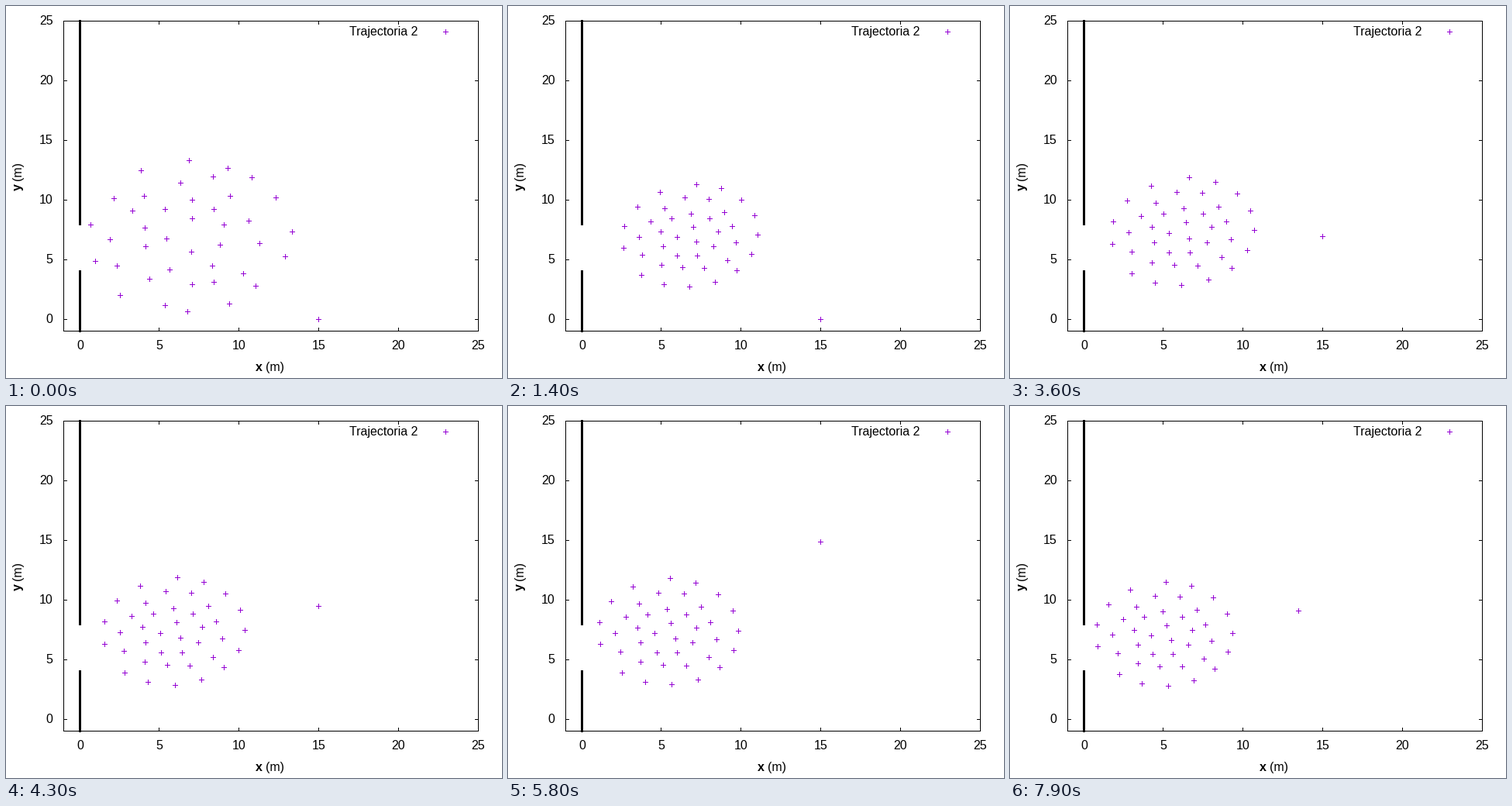
Write a matplotlib script that moves like this. It is 640 by 480 pixels and loops after 8 s.

```python
import numpy as np
import matplotlib.pyplot as plt
from matplotlib.animation import FuncAnimation
from matplotlib.collections import LineCollection

W, H, DPI = 640, 480, 100
FRAMES, STEP = 80, 100
PX = 72 / DPI
PURPLE = "#9400d3"
LEFT, RIGHT, TOP, BOTTOM = 74, 609, 19, 419

# Crowd centre (m), size and lean at a few key times (ms)
TIMES = [0, 900, 1400, 1900, 2600, 3600, 5000, 7900]
CENTRE_X = [6.8, 6.8, 6.75, 6.7, 6.55, 6.15, 5.5, 5.0]
CENTRE_Y = [7.05, 7.0, 7.0, 7.1, 7.15, 7.35, 7.4, 7.15]
SIZE = [1.43, 1.09, 0.96, 1.06, 0.97, 1.01, 1, 0.97]
LEAN = [0, 0.05, 0.07, 0.07, 0.06, 0.07, 0, 0]


def px(x):
    return LEFT + (x + 1) * (RIGHT - LEFT) / 26


def py(y):
    return BOTTOM - (y + 1) * (BOTTOM - TOP) / 26


def ring(n, radius, start, gap):
    deg = start + gap * np.arange(n)
    a = np.radians(deg)
    return np.column_stack([radius(deg) * np.cos(a), radius(deg) * np.sin(a)])


def flat(r):
    return lambda deg: np.full(len(deg), r)


def wavy(deg):
    return 3.12 + 0.3 * np.cos(np.radians(3 * (deg - 83)))


# Evenly spaced people: an outer ring in two arcs, two inner rings and a core
CROWD = np.vstack([
    ring(11, flat(4.5), -129.3, 21.7),
    ring(4, flat(4.35), 119.5, 25),
    ring(13, wavy, 15.9, 27.7),
    ring(9, flat(1.9), 10, 40),
    ring(3, flat(0.78), 72, 120),
])
SCATTER = np.random.default_rng(4).normal(0, 0.3, CROWD.shape)


def crowd(t):
    cx, cy, size, lean = (np.interp(t, TIMES, k)
                          for k in (CENTRE_X, CENTRE_Y, SIZE, LEAN))
    x, y = (CROWD * size + SCATTER * max(0, 1 - t / 1400)).T
    return np.column_stack([px(cx + x + lean * y), py(cy + y)])


def walker(t):
    """Constant speed: up along x = 15, left to 13.5, then down."""
    d = max(0, t - 1669) * 0.0036
    if d < 15:
        x, y = 15, d
    elif d < 16.5:
        x, y = 30 - d, 15
    else:
        x, y = 13.5, 31.5 - d
    return px(x), py(y)


def crosses(points):
    segs = []
    for x, y in np.rint(points):
        segs.append([(x - 3, y + 0.5), (x + 4, y + 0.5)])
        segs.append([(x + 0.5, y - 3), (x + 0.5, y + 4)])
    return segs


fig = plt.figure(figsize=(W / DPI, H / DPI), dpi=DPI, facecolor="white")
ax = fig.add_axes([0, 0, 1, 1])
ax.set_xlim(0, W)
ax.set_ylim(H, 0)
ax.axis("off")


def lines(segs, color, width=1):
    col = LineCollection(segs, colors=color, linewidths=width * PX, capstyle="butt")
    col.set_snap(False)
    ax.add_collection(col, autolim=False)
    return col


def label(x, y, s, ha="left", **kw):
    ax.text(x, y, s, ha=ha, va="baseline", family="Liberation Sans",
            size=16 * PX, color="black", **kw)


def axis_name(x, y, s, dx, dy, **kw):
    label(x, y, s, weight="bold", **kw)
    label(x + dx, y + dy, "(m)", **kw)


frame = [[(LEFT, y + 0.5), (RIGHT + 1, y + 0.5)] for y in (TOP, BOTTOM)]
frame += [[(x + 0.5, TOP), (x + 0.5, BOTTOM + 1)] for x in (LEFT, RIGHT)]
for k in range(0, 26, 5):
    x, y = round(px(k)), round(py(k))
    frame += [[(x + 0.5, e), (x + 0.5, e + 5)] for e in (TOP, BOTTOM - 4)]
    frame += [[(e, y + 0.5), (e + 5, y + 0.5)] for e in (LEFT, RIGHT - 4)]
    label(x + 0.5, 443, str(k), "center")
    label(60.5, y + 5, str(k), "right")
lines(frame, "black")
lines([[(95.5, 18), (95.5, 283)], [(95.5, 341), (95.5, 421)]], "black", 3)

axis_name(321.5, 471, "x", 13, 0)
axis_name(20, 238, "y", 0, -13, rotation=90, rotation_mode="anchor")
label(531, 38, "Trajectoria 2", "right")
lines(crosses([(567, 33)]), PURPLE)
agents = lines([], PURPLE)


def draw(i):
    t = i * STEP
    agents.set_segments(crosses(np.vstack([crowd(t), walker(t)])))
    return [agents]


anim = FuncAnimation(fig, draw, frames=FRAMES, interval=STEP, repeat=True,
                     repeat_delay=0, blit=False)
plt.show()
```
